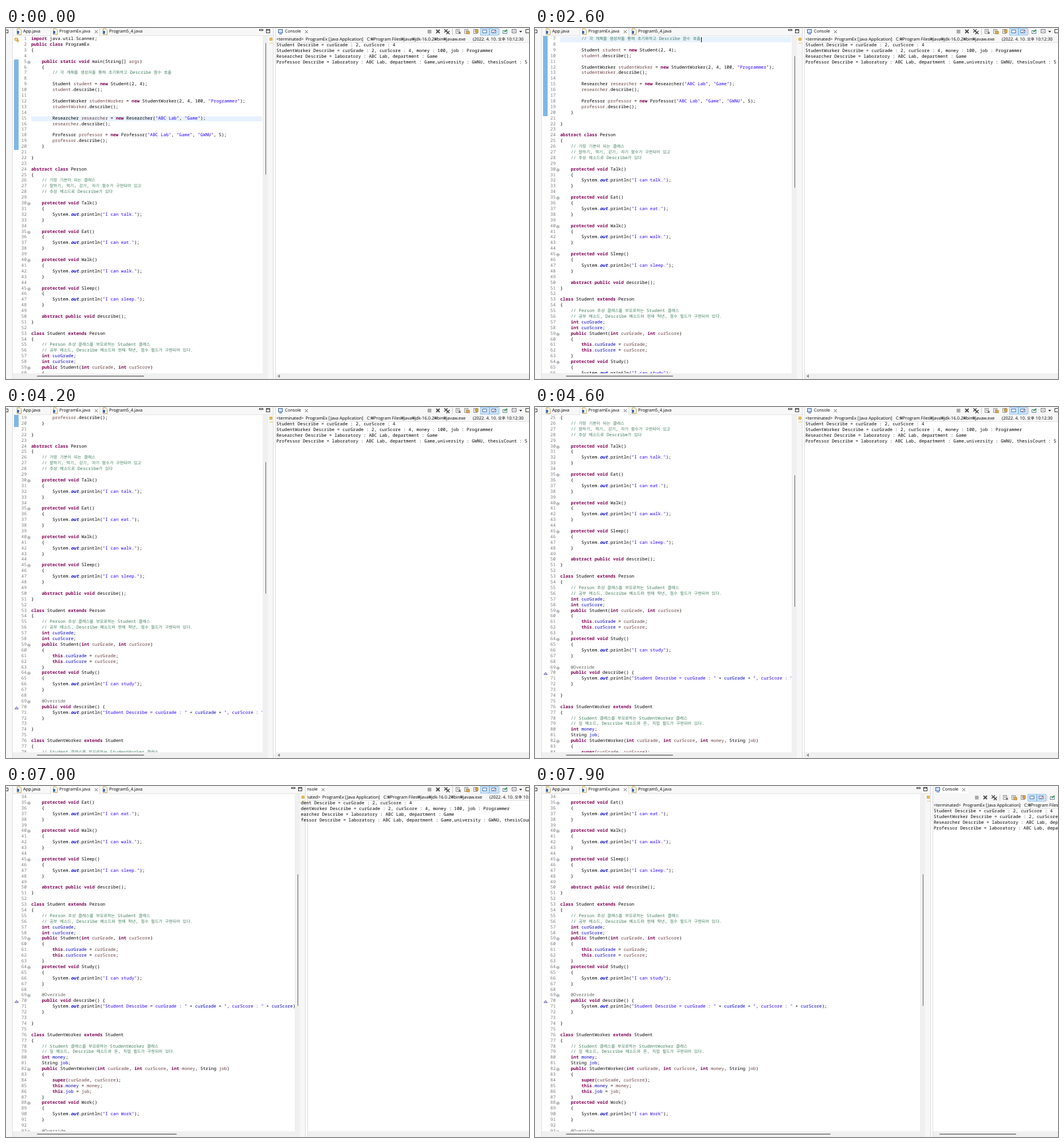
Write an HTML page that moves like this. It is 913x613 px and loops after 8000 ms.

```html
<!DOCTYPE html>
<html lang="ko">
<head>
<meta charset="utf-8">
<title>Code editor</title>
<style>
html, body { margin: 0; width: 100%; height: 100%; overflow: hidden; background: #fff; }
#stage { --dx: 0px; --cx: 0px; --wrap: 0; position: relative; width: 913px; height: 613px; overflow: hidden;
  background: #fff; color: #000; font: 7.5px/10px "Open Sans", "Noto Sans", "Noto Sans CJK KR", sans-serif;
  text-rendering: geometricPrecision; white-space: pre; }
#stage div, #stage svg { position: absolute; }
#stage i { font: normal .93em "Noto Sans CJK KR", "Noto Sans CJK JP", sans-serif; line-height: 0; }
.mono { font: 7.69px/9.897px "Noto Sans Mono", "DejaVu Sans Mono", monospace; }
.bar { background: #f0f0f0; }
.strip { background: #f7f7f7; }
.thumb { background: #8c8c8c; border-radius: 1px; }
#down { background: #606060; }
#code { left: 14px; top: 14px; width: calc(434px + var(--dx)); height: 589px; overflow: hidden; }
#rows { left: 0; width: 1200px; }
.row { left: 30px; height: 9.897px; }
.num { left: -30px; width: 22px; text-align: right; color: #787878; }
.fold { left: -7.5px; top: 2px; }
.kw { color: #7f0055; font-weight: bold; }
.str { color: #2a00ff; }
.com { color: #3f7f5f; }
.field { color: #0000c0; }
.local { color: #6a3e3e; }
.ann { color: #646464; }
.out { color: #0000c0; font-weight: bold; font-style: italic; }
#current { left: 30px; width: 403px; height: 9.9px; background: #e8f2fe; }
#caret { width: 1px; height: 9px; background: #000; }
#gutter { left: calc(448px + var(--dx)); top: 0; width: 20px; height: 613px; }
#console { left: calc(470px + var(--dx)); top: 0; right: 0; height: 613px; overflow: hidden; background: #fff; }
#head { left: calc(var(--cx) - var(--dx) - 470px); top: 0; }
#output { left: calc(459px + var(--dx)); top: calc(26px + 14px * var(--wrap)); right: 0; height: 60px; overflow: hidden; }
#output div { left: calc(13px + var(--cx) - var(--dx)); }
</style>
</head>
<body>
<div id="stage"></div>
<script>
const ROW = 9.897, LOOP = 8000;

const method = (name, said) => `    protected void ${name}()
    {
        System.out.println("I can ${said}");
    }`;

const source = `import java.util.Scanner;
public class ProgramEx
{

    public static void main(String[] args)
    {
        // 각 개체를 생성자를 통해 초기화하고 Describe 함수 호출

        Student student = new Student(2, 4);
        student.describe();

        StudentWorker studentWorker = new StudentWorker(2, 4, 100, "Programmer");
        studentWorker.describe();

        Researcher researcher = new Researcher("ABC Lab", "Game");
        researcher.describe();

        Professor professor = new Professor("ABC Lab", "Game", "GWNU", 5);
        professor.describe();
    }

}

abstract class Person
{
    // 가장 기본이 되는 클래스
    // 말하기, 먹기, 걷기, 자기 함수가 구현되어 있고
    // 추상 메소드로 Describe가 있다

${method('Talk', 'talk.')}

${method('Eat', 'eat.')}

${method('Walk', 'walk.')}

${method('Sleep', 'sleep.')}

    abstract public void describe();
}

class Student extends Person
{
    // Person 추상 클래스를 부모로하는 Student 클래스
    // 공부 메소드, Describe 메소드와 현재 학년, 점수 필드가 구현되어 있다.
    int curGrade;
    int curScore;
    public Student(int curGrade, int curScore)
    {
        this.curGrade = curGrade;
        this.curScore = curScore;
    }
${method('Study', 'study')}

    @Override
    public void describe() {
        System.out.println("Student Describe = curGrade : " + curGrade + ", curScore : " + curScore);
    }

}

class StudentWorker extends Student
{
    // Student 클래스를 부모로하는 StudentWorker 클래스
    // 일 메소드, Describe 메소드와 돈, 직업 필드가 구현되어 있다.
    int money;
    String job;
    public StudentWorker(int curGrade, int curScore, int money, String job)
    {
        super(curGrade, curScore);
        this.money = money;
        this.job = job;
    }
${method('Work', 'Work')}

    @Override`.split('\n');

const output = [
  'Student Describe = curGrade : 2, curScore : 4',
  'StudentWorker Describe = curGrade : 2, curScore : 4, money : 100, job : Programmer',
  'Researcher Describe = laboratory : ABC Lab, department : Game',
  'Professor Describe = laboratory : ABC Lab, department : Game,university : GWNU, thesisCount : 5'
];

const hangul = s => s.replace(/[가-힣]+/g, '<i>$&</i>');
const token = new RegExp([
  '(?<com>//.*)', '(?<str>"[^"]*")', '(?<ann>@\\w+)',
  '(?<kw>\\b(?:import|public|class|static|void|new|abstract|protected|extends|int|this|super)\\b)',
  '(?<out>(?<=System\\.)out)',
  '(?<field>(?<=this\\.|\\+ |^    \\w+ )(?:curGrade|curScore|money|job)\\b)',
  '(?<local>\\b(?:curGrade|curScore|money|job|args|student|studentWorker|researcher|professor)\\b)'
].join('|'), 'g');
const paint = line => line.replace(token, (...m) => {
  const groups = m[m.length - 1];
  const kind = Object.keys(groups).find(k => groups[k] !== undefined);
  return `<span class="${kind}">${hangul(m[0])}</span>`;
});

// Boxes and labels
const px = v => typeof v === 'number' ? v + 'px' : v;
const box = (x, y, w, h, cls = '', style = '', id = '') =>
  `<div id="${id}" class="${cls}" style="left:${px(x)};top:${px(y)};width:${px(w)};height:${px(h)};${style}"></div>`;
const label = (x, y, text) => `<div style="left:${x}px;top:${y - 5}px">${hangul(text)}</div>`;
const svg = (x, y, w, h, body, id = '') =>
  `<svg id="${id}" style="left:${px(x)};top:${px(y)}" width="${w}" height="${h}" fill="none" stroke-width="1">${body}</svg>`;
const rect = (x, y, w, h, fill, stroke = 'none') =>
  `<rect x="${x}" y="${y}" width="${w}" height="${h}" fill="${fill}" stroke="${stroke}"/>`;
const path = (d, stroke, fill = 'none', width = 1) =>
  `<path d="${d}" stroke="${stroke}" fill="${fill}" stroke-width="${width}"/>`;
const cross = (x, y, r, color, width) =>
  path(`M${x - r} ${y - r}l${2 * r} ${2 * r}m0 ${-2 * r}l${-2 * r} ${2 * r}`, color, 'none', width);

const fileIcon = x => svg(x, 1, 11, 11,
  path('M2.5 .5h5l2 2v8h-7z', '#b79b55', '#fffbea') + rect(2, 4, 4, 5, '#3d6fb4'));
const closeIcon = x => svg(x - 4, 2, 9, 9, cross(4.5, 4.5, 2.6, '#444', .9));
const foldIcon = svg(0, 0, 6, 6,
  '<circle cx="3" cy="3" r="2.3" stroke="#87929d" stroke-width=".9"/>' + path('M1.5 3h3', '#56626e', 'none', .9));
const folded = /\b(main|protected|public Student)|@Override/;

const rows = source.map((line, n) => `<div class="row" style="top:${n * ROW}px">` +
  `<div class="num">${n + 1}</div>` +
  (folded.test(line) ? `<div class="fold">${foldIcon}</div>` : '') + paint(line) + '</div>').join('');

const markers =
  box(0, 4 * ROW, 8, 16 * ROW, '', 'background:#7db7e8') +
  svg(0, 1, 9, 9, rect(1.5, 1.5, 5, 4, '#ffe08a', '#c79a2c') + path('M5 4v4h3V5z', '#c98f1d', '#f3c04d', .7)) +
  svg(0, 69 * ROW + 2, 9, 7, path('M1.5 5.2L4.5 1.5L7.5 5.2z', '#4646a8', '#dcdcf6', .9));

const editor =
  box(0, 0, 'calc(468px + var(--dx))', 13, 'strip') +
  box(0, 0, 11, 613, 'strip') + box(11, 0, 1, 613, '', 'background:#dedede') +
  box(12, 13, 'calc(456px + var(--dx))', 1, '', 'background:#e4e4e4') +
  box(79, 0, 84, 14, '', 'background:#fff;box-shadow:-1px 0 #d8d8d8,1px 0 #d8d8d8') +
  svg(-3, 2, 8, 9, rect(.5, 1.5, 6, 5, '#fff', '#333')) +
  fileIcon(17) + fileIcon(80) + fileIcon(167) +
  label(30, 6, 'App.java') + label(93, 6, 'ProgramEx.java') + label(180, 6, 'Program5_4.java') + closeIcon(157) +
  `<div id="code" class="mono"><div id="rows"><div id="current"></div>${markers}${rows}<div id="caret"></div></div></div>` +
  box(12, 603, 'calc(456px + var(--dx))', 10, 'bar') +
  box(54, 607, 187, 2, 'thumb', '', 'across') +
  '<div id="gutter">' +
    box(0, 14, 9, 589, 'bar') + box(9, 14, 10, 599, 'strip') +
    box(5, 26, 1, 230, 'thumb', '', 'down') +
    svg(2, 15, 7, 588, path('M1 6L3.5 3L6 6z', 'none', '#777') + path('M1 581L3.5 584L6 581z', 'none', '#777'), 'arrows') +
    svg(-12, 0, 30, 30, rect(6.5, 2.5, 6, 2, '#fff', '#333') + rect(18.5, 2.5, 6, 6, '#fff', '#333') +
      path('M18 4h7', '#333') + rect(24.5, 17.5, 4, 4, '#f7c55a', '#d9a032') + path('M24 26.5h6', '#efc75e')) +
    box(18, 0, 1, 613, '', 'background:#dcdcdc') +
  '</div>';

const page = (x, mark) => rect(x - 3.5, 2.5, 6, 7, '#fff', '#8b8b8b') + path(`M${x - 2} 4.5h3m-3 2h3`, '#7d93b5') + mark;
const screen = x => rect(x - 7.5, .5, 15, 12, '#cfe6fb', '#8fc1ec') + rect(x - 4, 3.5, 7, 5, '#fff', '#3c6da6');
const tools = svg('calc(32px * var(--wrap) - 470px - var(--dx))', 'calc(14px * var(--wrap))', 913, 13,
  rect(736, 3, 6.5, 6.5, '#a9a9a9') + cross(754, 6, 3, '#4c4c4c', 2) +
  cross(768, 5, 2.8, '#4c4c4c', 1.6) + cross(771.5, 8, 2.8, '#4c4c4c', 1.6) + path('M779.5 1v11M861.5 1v11', '#c4c4c4') +
  page(789, cross(792, 8.5, 1.7, '#555', 1.2)) + page(804, rect(804, 6, 5, 4, '#e6b34c', '#a87922')) +
  page(820, rect(820, 3, 4, 5, '#e6b34c', '#a87922')) + screen(836) + screen(852) +
  path('M850 8l5-4', '#c0392b') + rect(867.5, 4.5, 7, 5, '#fff', '#5b7f9c') + path('M870 7l5-4', '#2f9e44', 'none', 2) +
  rect(883.5, 2.5, 7, 6, '#fff', '#6b6b6b') + path('M885 5.5h4', '#6b8fc0') + path('M896 5h5l-2.5 3z', 'none', '#333') +
  rect(907.5, 2.5, 7, 6, '#fff', '#333'));

const consoleView = '<div id="console">' +
  box(0, 0, 443, 'calc(25px + 14px * var(--wrap))', 'strip') +
  box(0, 'calc(25px + 14px * var(--wrap))', 443, 1, '', 'background:#e2e2e2') +
  box(0, 0, 1, 613, '', 'background:#dcdcdc') + box(1, 603, 443, 10, 'bar') +
  '<div id="head">' +
    box(472, 0, 60, 13, '', 'background:#fff') +
    svg(475, 2, 10, 10, rect(.5, .5, 7, 6, '#cfe2fa', '#2f5f9e') + path('M2 8.5h5', '#2f5f9e')) +
    label(487, 6, 'Console') + closeIcon(524) +
    '<div style="left:0;top:calc(14px * var(--wrap))">' +
      label(472, 20, '&lt;terminated&gt;') + label(523, 20, 'ProgramEx') + label(563, 20, '[Java Application]') +
      label(630, 20, 'C:₩Program Files₩Java₩jdk-16.0.2₩bin₩javaw.exe') + label(815, 20, '(2022. 4. 10. 오후 10:12:30') +
    '</div>' +
    box(482, 607, 134, 2, 'thumb', '', 'consoleThumb') +
    svg(472, 604, 8, 8, path('M6 1L2 4L6 7z', 'none', '#8a8a8a'), 'consoleArrow') +
  '</div>' + tools + '</div>' +
  '<div id="output" class="mono">' +
    output.map((line, n) => `<div style="top:${n * ROW}px">${line}</div>`).join('') + '</div>';

const stage = document.getElementById('stage');
stage.innerHTML = editor + consoleView;
const el = id => document.getElementById(id);

// Steps: [time, values...]
const scrolls = [[0, 0], [2200, 3], [2600, 6], [2800, 9], [3200, 12], [3600, 15], [4200, 18],
  [4400, 21], [4600, 24], [5000, 27], [5100, 30], [5300, 33]];
const currents = [[0, 15], [900, 7]];
const carets = [[0, 0], [900, 272], [1400, 0], [1600, 290], [2100, 0], [2600, 290], [2800, 0]];
const hovers = [[0, 0], [5900, 1], [6100, .5], [6400, 0]];
// Sash offset, console offset
const drags = [[0, 0, 0], [6900, 29, 0], [7000, 56, 29], [7100, 93, 93], [7200, 140, 140],
  [7300, 185, 185], [7400, 220, 220], [7800, 223, 223], [7900, 224, 224]];
const at = (steps, t) => steps.filter(s => s[0] <= t).pop().slice(1);

function render(t) {
  const [line] = at(scrolls, t), [current] = at(currents, t), [caret] = at(carets, t);
  const [hover] = at(hovers, t), [dx, cx] = at(drags, t);

  el('rows').style.top = 1.05 - line * ROW + 'px';
  el('current').style.top = (current - 1) * ROW + 'px';
  Object.assign(el('caret').style, {
    left: caret - 14 + 'px', top: 6 * ROW + .5 + 'px', visibility: caret ? 'visible' : 'hidden'
  });
  Object.assign(el('down').style, {
    top: 26 + line * 3.87 + 'px', left: 5 - 2 * hover + 'px', width: 1 + 4 * hover + 'px'
  });
  el('arrows').style.opacity = hover;
  el('across').style.width = 187 + .948 * dx + .00125 * dx * dx + 'px';
  el('consoleThumb').style.opacity = cx > 100 ? 1 : 0;
  el('consoleArrow').style.opacity = dx ? 0 : 1;

  stage.style.setProperty('--dx', dx + 'px');
  stage.style.setProperty('--cx', cx + 'px');
  stage.style.setProperty('--wrap', cx > 195 ? 1 : 0);
}

const start = performance.now();
function tick() {
  render((performance.now() - start) % LOOP);
  requestAnimationFrame(tick);
}
tick();
</script>
</body>
</html>
```
